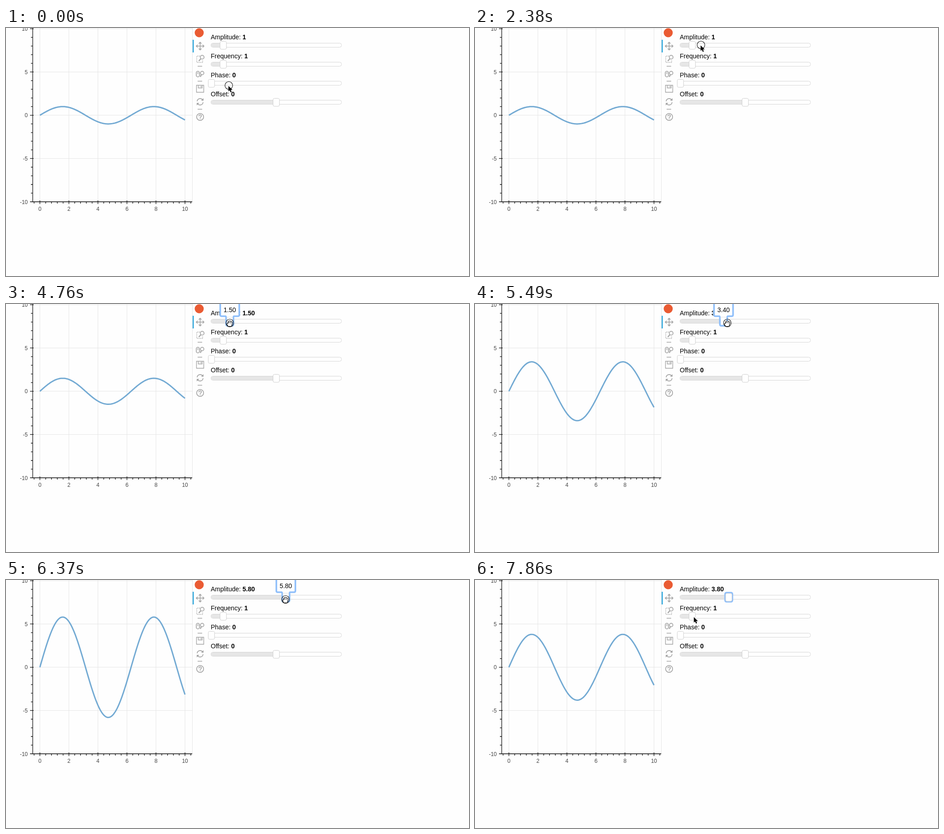
An HTML page that plays this animation: 1022x548 px, repeating every 8000 ms.

```html
<!DOCTYPE html>
<html lang="en">
<head>
<meta charset="utf-8">
<title>Sine sliders</title>
<style>
  html, body { margin: 0; width: 100%; height: 100%; overflow: hidden; background: #fefefe; }
  svg { display: block; width: 100%; height: 100%; }
  text { font: 14px "Liberation Sans", Arial, sans-serif; white-space: pre; }
  .bold { font-weight: bold; }
  .tick text { font-size: 12px; fill: #444; }
  .icon { fill: none; stroke: #a4a4a4; stroke-width: 1.7; }
  .handle { fill: #fff; stroke: #cfcfcf; }
  .glow { fill: #fff; stroke: #8fbffa; stroke-width: 3.6; stroke-linejoin: round; }
</style>
</head>
<body>
<svg viewBox="0 0 1022 548">
  <g id="plot"></g>
  <path id="curve" fill="none" stroke="#73aad3" stroke-width="3" stroke-linejoin="round"/>

  <circle cx="426.5" cy="10.5" r="10" fill="#ea5b33"/>
  <path d="M412 26h2.4v28h-2.4z" fill="#26a4dc"/>
  <g class="icon">
    <path d="M420.5 40h16M428.5 32v16M423 37l-3 3 3 3M434 37l3 3-3 3M425.5 34.5l3-3 3 3M425.5 45.5l3 3 3-3"/>
    <path d="M428 62h-7v14h13v-5" stroke-width="1.3" stroke-dasharray="2 1.6"/>
    <circle cx="433" cy="64.5" r="4.2"/>
    <path d="M430 68l-4.5 5" stroke-width="2.4"/>
    <rect x="420" y="95.5" width="7" height="12.5" rx="3.5"/>
    <path d="M423.5 97.5v4"/>
    <circle cx="433" cy="99.5" r="3.8"/>
    <path d="M431 103l-2 5" stroke-width="2.4"/>
    <path d="M420.5 126.5h16v15.5h-16zM424.5 127v5.5h8.500v-5.500M430.500 128v3" stroke-width="1.400"/>
    <path d="M422 162a6.500 6.500 0 0 1 12-3M435 164a6.500 6.500 0 0 1-12 3"/>
    <path d="M436 155v5.500h-5.500zM421 171v-5.500h5.500z" fill="#a4a4a4" stroke="none"/>
    <circle cx="428.500" cy="196.500" r="7.700"/>
    <path d="M425.800 195q0-3 2.700-3 2.800 0 2.800 2.400 0 1.500-2.700 3v1M428.600 199.500v1.800"/>
    <path d="M423 84.500h10M423 117.500h10M423 179.500h10" stroke-width="1.300"/>
  </g>

  <g id="sliders"></g>
  <g id="tip">
    <path id="bubble" class="glow"/>
    <path d="M-7 32q0-3 3-3h8q3 0 3 3" fill="none" stroke="#e2e2e2"/>
    <text id="tipText" y="17.500" text-anchor="middle"></text>
  </g>

  <g id="cursor">
    <path id="arrow" d="M0 0v12l2.800-2.500 2 4.700 2.300-1-2-4.500h3.900z" stroke="#fff" stroke-width="1.600" paint-order="stroke"/>
    <g id="hand" fill="#fff" stroke="#000" stroke-width="1.100" stroke-linejoin="round">
      <path d="M-3.500 7.500l-2.700-4.300q-1-2 .9-2.400l1.100.5v-2.800q0-2 1.600-1.900.6-1.700 2.100-.8 1.400-1 2.300.7 1.600-.5 1.900 1 1.900-.4 2 1.500 0 4-1.700 6.500v2z"/>
      <path d="M-2.500-2v2M0-2v2M2.500-1.500v2" fill="none"/>
    </g>
    <circle id="ring" r="8.500" fill="none" stroke="#111" stroke-width="1.100"/>
  </g>
</svg>
<script>
const $ = id => document.getElementById(id);
const LOOP = 8000, STEP = 148.3;
const px = x => 74.8 + 32.03 * x;
const py = y => 192.8 - 19.12 * y;
const slider = v => 450.7 + 28.8 * v;

// Axes, grid and tick labels
let grid = 'M411.5 0V384', ticks = 'M59 0V384H411', labels = '';
for (let x = 0; x <= 10; x += 2) {
  grid += `M${px(x)} 0V384`;
  ticks += `M${px(x)} 381V389`;
  labels += `<text x="${px(x)}" y="403.5" text-anchor="middle">${x}</text>`;
}
for (let y = -10; y <= 10; y += 5) {
  grid += `M59 ${py(y)}H411`;
  ticks += `M53 ${py(y)}H61`;
  labels += `<text x="48" y="${py(y) + 4.5}" text-anchor="end">${y}</text>`;
}
for (let i = -1; i <= 26; i++) ticks += `M${px(i * .4)} 384v4`;
for (let y = -10; y <= 10; y++) ticks += `M55 ${py(y)}h4`;
$('plot').innerHTML = `<path d="${grid}" stroke="#e5e5e5"/>
  <path d="${ticks}" fill="none" stroke="#111" stroke-width="1.3"/><g class="tick">${labels}</g>`;

// Sliders
$('sliders').innerHTML = [
  ['Amplitude', 1, 479.5], ['Frequency', 1, 479.5], ['Phase', 0, 453.5], ['Offset', 0, 596.5]
].map(([name, value, x], i) => `<g transform="translate(0 ${i * 42})">
  <text x="452" y="25">${name}: <tspan class="bold" id="value${i}">${value}</tspan></text>
  <rect x="452.5" y="33.5" width="288" height="9" rx="4" fill="#fff" stroke="#d5d5d5"/>
  <rect id="fill${i}" x="453" y="34" width="${x - 453}" height="8" rx="3" fill="#e6e6e6"/>
  <g id="handle${i}" transform="translate(${x})">
    <rect class="glow" x="-8" y="28" width="16" height="20" rx="3" visibility="hidden"/>
    <rect class="handle" x="-7" y="29.500" width="14" height="17.500" rx="3"/>
  </g></g>`).join('');
const focus = $('handle0').firstElementChild;

// Keys: [step, value, ...]
const amplitudeKeys = [[0, 1], [27, 1], [29, 1.1], [32, 1.5], [34, 1.9], [37, 3.4], [40, 4.9],
  [42, 5.6], [43, 5.8], [44, 5.9], [45, 5.8], [48, 4.4], [50, 3.8], [54, 3.8]];
const cursorKeys = [[0, 491, 128], [1, 486, 103], [2, 482, 81], [3, 481, 74], [4, 481, 74],
  [8, 480, 59], [12, 480, 48], [16, 498, 38.5], [20, 508, 39], [21, 508, 39], [24, 478, 43],
  [27, 477, 42.5], [32, 494, 42], [34, 507, 42], [37, 557, 42], [40, 598, 42], [42, 614, 43],
  [43, 617, 43], [44, 620, 43], [45, 616, 43], [48, 578, 43], [50, 561, 43], [51, 558, 44],
  [52, 520, 66], [53, 483, 82], [54, 483, 82]];

function at(keys, step) {
  const n = keys.findIndex(k => k[0] > step);
  if (n < 0) return keys[keys.length - 1].slice(1);
  const a = keys[n - 1], b = keys[n], f = (step - a[0]) / (b[0] - a[0]);
  return a.slice(1).map((v, i) => v + (b[i + 1] - v) * f);
}
const show = (el, on) => el.setAttribute('visibility', on ? 'visible' : 'hidden');
const within = (v, a, b) => v >= a && v <= b;

function draw(now) {
  const step = Math.floor(now % LOOP / STEP + .06);
  const amp = Math.round(at(amplitudeKeys, step)[0] * 10) / 10;
  const [x, y] = at(cursorKeys, step);
  const hx = slider(amp), label = amp === 1 ? '1' : amp.toFixed(2);
  const dragging = within(step, 24, 50);

  let d = '';
  for (let i = 0; i <= 200; i++) d += `${i ? 'L' : 'M'}${px(i / 20)} ${py(amp * Math.sin(i / 20))}`;
  $('curve').setAttribute('d', d);

  $('value0').textContent = $('tipText').textContent = label;
  $('fill0').setAttribute('width', hx - 453);
  $('handle0').setAttribute('transform', `translate(${hx})`);
  show(focus, step >= 24);

  const w = label.length > 1 ? 21 : 11.8;
  $('bubble').setAttribute('d', `M${-w} -8V24q0 3 3 3H-9q1 1 1 3V45q0 3 3 3H5q3 0 3-3V30q0-2 1-3H${w - 3}q3 0 3-3V-8z`);
  $('tip').setAttribute('transform', `translate(${hx})`);
  show($('tip'), dragging);

  $('cursor').setAttribute('transform', `translate(${x} ${y})`);
  show($('arrow'), !dragging);
  show($('hand'), dragging);
  $('ring').setAttribute('transform', dragging ? '' : 'translate(.8 -1)');
  show($('ring'), step <= 2 || within(step, 11, 20) || within(step, 29, 51));
  requestAnimationFrame(draw);
}
requestAnimationFrame(draw);
</script>
</body>
</html>
```
